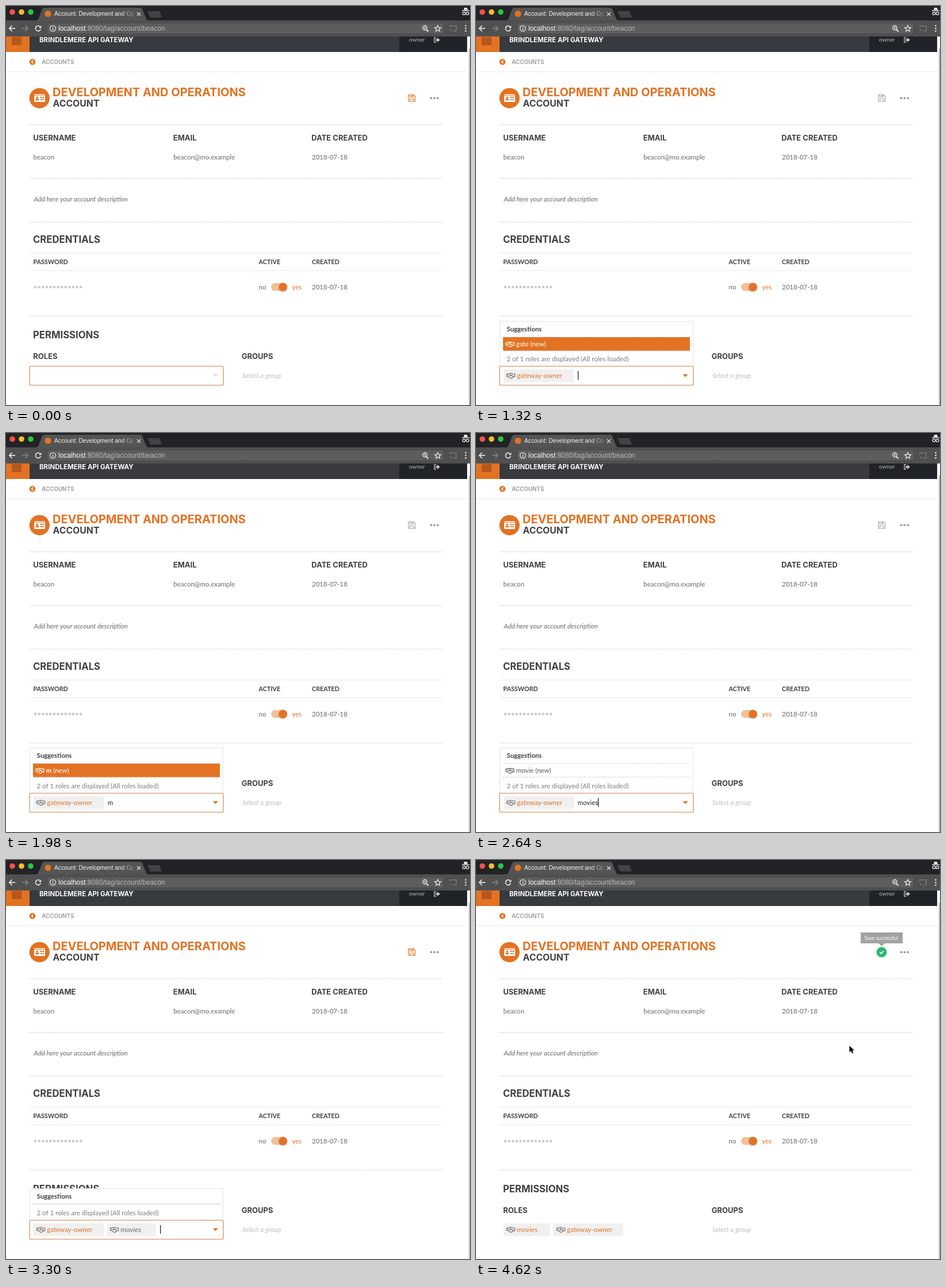
Write an HTML page with a canvas that moves like this. It is 807 px wide and 694 px high and loops after 4950 ms.

```html
<!DOCTYPE html>
<html lang="en">
<head>
<meta charset="utf-8">
<title>Account roles</title>
<style>
html, body { margin: 0; width: 100%; height: 100%; overflow: hidden; background: #fff; }
canvas { display: block; }
</style>
</head>
<body>
<canvas id="stage" width="807" height="694"></canvas>
<script>
const ctx = document.getElementById('stage').getContext('2d');
const ORANGE = '#e37222', DARK = '#3f4042', GREY = '#696969';
const STEP = 330;
const ROLE = 'gateway-owner';

const lato = (size, style = '') => `${style} ${size}px Lato, sans-serif`;
const head = size => `700 ${size}px Inter, sans-serif`;
const ui = size => `${size}px "Liberation Sans", Arial, sans-serif`;
const BODY = lato(11.5), BOLD = lato(11.4, '700'), ITALIC = lato(11.5, 'italic');

// Draws text and returns the x where it ends.
function text(str, x, y, font = BODY, color = GREY) {
  ctx.font = font;
  ctx.fillStyle = color;
  ctx.fillText(str, x, y);
  return x + ctx.measureText(str).width;
}

function rect(x, y, w, h, color) {
  ctx.fillStyle = color;
  ctx.fillRect(x, y, w, h);
}

function circle(x, y, r, color) {
  ctx.beginPath();
  ctx.arc(x, y, r, 0, Math.PI * 2);
  ctx.fillStyle = color;
  ctx.fill();
}

function trace(points, close) {
  ctx.beginPath();
  points.forEach(([x, y]) => ctx.lineTo(x, y));
  if (close) ctx.closePath();
}

function poly(points, color) {
  trace(points, true);
  ctx.fillStyle = color;
  ctx.fill();
}

function line(points, color, width = 1, close = false) {
  trace(points, close);
  ctx.strokeStyle = color;
  ctx.lineWidth = width;
  ctx.stroke();
}

function ring(x, y, r, color, width = 1, from = 0, to = Math.PI * 2) {
  ctx.beginPath();
  ctx.arc(x, y, r, from, to);
  ctx.strokeStyle = color;
  ctx.lineWidth = width;
  ctx.stroke();
}

function dotted(x1, x2, y, color = '#cfcfcf', width = 1.3) {
  ctx.setLineDash([1.6, 1.6]);
  line([[x1, y], [x2, y]], color, width);
  ctx.setLineDash([]);
}

function at(x, y, draw) {
  ctx.save();
  ctx.translate(x, y);
  draw();
  ctx.restore();
}

function handshake(x, y, color) {
  at(x, y, () => {
    line([[0, -3], [3, -3], [5, -4], [9, -4], [11, -3], [14, -3], [14, 2],
      [12, 2], [8, 4.5], [5.5, 4], [2.5, 1.5], [0, 1.5]], color, 1.2, true);
    line([[7.5, -3.5], [5, -0.5], [6.5, 0.7], [8.5, -1], [11.5, 2]], color, 1.1);
    line([[2.5, -3], [2.5, 1.5]], color, 0.8);
  });
}

function star(cx, cy, r) {
  const points = Array.from({ length: 10 }, (_, i) => {
    const a = i * Math.PI / 5 - Math.PI / 2, d = i % 2 ? r * 0.45 : r;
    return [cx + d * Math.cos(a), cy + d * Math.sin(a)];
  });
  line(points, '#f0f0f0', 1.2, true);
}

function drawBrowser() {
  rect(0, 0, 807, 25, '#212326');
  ['#fc5049', '#fdbb2d', '#2bc840'].forEach((c, i) => circle(11 + 16 * i, 10.5, 4.8, c));
  poly([[53, 25], [56, 23], [63, 5], [66, 3], [234, 3], [237, 5], [244, 23], [247, 25]], '#545454');
  poly([[246, 9], [267, 9], [271, 20], [251, 20]], '#424344');
  circle(73, 13.5, 5.5, ORANGE);
  const fade = ctx.createLinearGradient(200, 0, 224, 0);
  fade.addColorStop(0, '#f4f4f4');
  fade.addColorStop(1, '#666');
  text('Account: Development and Op', 84, 17, ui(10.2), fade);
  line([[228, 11], [234, 17]], '#ddd', 1.3);
  line([[234, 11], [228, 17]], '#ddd', 1.3);

  // private-window badge
  poly([[796, 7], [797, 3], [802, 3], [803, 7]], '#eee');
  rect(793, 7.5, 13, 1.4, '#eee');
  ring(796.5, 13, 2.4, '#eee', 1.3);
  ring(802.5, 13, 2.4, '#eee', 1.3);

  rect(0, 25, 807, 28, '#505050');
  ctx.beginPath();
  ctx.roundRect(71.5, 29.5, 690, 19, 2.5);
  ctx.fillStyle = '#5d5d5d';
  ctx.fill();
  ctx.strokeStyle = '#484848';
  ctx.lineWidth = 1;
  ctx.stroke();
  const arrow = (x, dir, color) => {
    line([[x - 5, 39], [x + 5, 39]], color, 1.6);
    line([[x + dir * 0.5, 34], [x + dir * 5.2, 39], [x + dir * 0.5, 44]], color, 1.6);
  };
  arrow(11, -1, '#f2f2f2');
  arrow(33, 1, '#858585');
  ring(56, 39, 4.5, '#f2f2f2', 1.6, 0.3, 5.4);
  poly([[57, 38.3], [61.3, 38.3], [61.3, 34]], '#f2f2f2');
  ring(81.5, 39, 5, '#eee', 1.2);
  rect(80.9, 38, 1.3, 4, '#eee');
  rect(80.9, 35.8, 1.3, 1.3, '#eee');
  const end = text('localhost', 91, 43, ui(12), '#fff');
  text(':8080/tag/account/beacon', end, 43, ui(12), '#b9b9b9');
  ring(728.5, 38, 3.7, '#f0f0f0', 1.4);
  line([[731, 41], [734.5, 44.5]], '#f0f0f0', 1.8);
  line([[726.7, 38], [730.3, 38]], '#f0f0f0', 1);
  line([[728.5, 36.2], [728.5, 39.8]], '#f0f0f0', 1);
  star(751, 39.5, 5.6);
  line([[772, 37], [772, 34.5], [783, 34.5], [783, 43.5], [778, 43.5]], '#858585', 1.2);
  ring(772, 44, 2.5, '#858585', 1.1, -Math.PI / 2, 0);
  [34.5, 39, 43.5].forEach(y => circle(799.5, y, 1.3, '#f0f0f0'));
}

function drawHeader() {
  rect(0, 53, 41, 27, ORANGE);
  rect(10, 54, 17, 14, '#b4581b');
  rect(41, 53, 643, 27, '#373a3f');
  rect(684, 53, 118, 27, '#202428');
  text('BRINDLEMERE API GATEWAY', 58, 63, head(11.5), '#fff');
  text('owner', 701, 62, lato(9.8), '#b5b7b9');
  line([[748, 55], [745, 55], [745, 63], [748, 63]], '#c4c6c8', 1.3);
  rect(747, 57.7, 4, 2.8, '#c4c6c8');
  poly([[750, 55], [755, 59], [750, 63]], '#c4c6c8');

  rect(802, 53, 5, 641, '#fafafa');
  rect(805, 74, 2, 620, '#bfbfbf');
  circle(46, 97.2, 5.3, ORANGE);
  line([[47.3, 94.6], [44.7, 97.2], [47.3, 99.8]], '#fff', 1.5);
  text('ACCOUNTS', 62, 101.3, head(9.8), '#a3a3a3');
  rect(0, 114, 802, 1, '#e8e8e8');
}

function drawAccount() {
  circle(58.3, 160.3, 17.6, ORANGE);
  ctx.beginPath();
  ctx.roundRect(49, 153.5, 19, 13.5, 1.5);
  ctx.fillStyle = '#fff';
  ctx.fill();
  rect(49, 155.2, 19, 0.9, ORANGE);
  circle(54.3, 159.3, 1.7, ORANGE);
  rect(51.5, 161.3, 5.6, 2.8, ORANGE);
  rect(59.3, 158, 3, 2, ORANGE);
  rect(63.3, 158, 2.7, 2, ORANGE);
  rect(59.3, 162, 6.7, 1.6, ORANGE);
  text('DEVELOPMENT AND OPERATIONS', 81, 157, head(20), ORANGE);
  text('ACCOUNT', 81.6, 175, head(15.8), DARK);
  [739.5, 745.2, 751].forEach(x => circle(x, 160.3, 1.8, '#8d8d8d'));

  [206.7, 300, 375.8, 539.2].forEach(y => dotted(41, 759, y));
  [['USERNAME', 47.3], ['EMAIL', 290.8], ['DATE CREATED', 531.3]]
    .forEach(([label, x]) => text(label, x, 234, head(13), DARK));
  text('beacon', 47.5, 266.5);
  text('beacon@mo.example', 291.3, 266.5);
  text('2018-07-18', 532, 267.3);
  text('Add here your account description', 48.5, 340, ITALIC);

  text('CREDENTIALS', 47, 412, head(16.7), DARK);
  rect(41, 429, 717, 1, '#e9e9e9');
  rect(41, 460, 717, 1, '#e9e9e9');
  [['PASSWORD', 47.3], ['ACTIVE', 439.5], ['CREATED', 532]]
    .forEach(([label, x]) => text(label, x, 449.2, lato(10.8, '700'), DARK));
  for (let i = 0; i < 13; i++) circle(51 + 6.6 * i, 488.9, 2.3, '#cbcbcb');
  text('no', 439.5, 492.5);
  ctx.beginPath();
  ctx.roundRect(461, 482, 28, 13.5, 6.75);
  ctx.fillStyle = '#f5bf98';
  ctx.fill();
  ctx.save();
  ctx.shadowColor = 'rgba(0,0,0,.3)';
  ctx.shadowBlur = 3;
  ctx.shadowOffsetY = 1;
  circle(481.8, 488.8, 7.2, ORANGE);
  ctx.restore();
  text('yes', 497.5, 492.5, BODY, ORANGE);
  text('2018-07-18', 532, 492.5);

  text('PERMISSIONS', 47, 578, head(16.7), DARK);
  text('ROLES', 47.3, 613.6, head(13), DARK);
  text('GROUPS', 409.7, 613.6, head(13), DARK);
  text('Select a group', 411, 647, ITALIC, '#bdbdbd');
}

function drawMenu({ rows, active = -1, lift = 0 }) {
  const rowsTop = 600 - 24 * rows.length - lift;
  const top = rowsTop - (rows.length ? 28 : 29);
  rect(41, top, 337, 627 - top, '#fff');
  ctx.strokeStyle = '#e4e4e4';
  ctx.lineWidth = 1;
  ctx.strokeRect(41.5, top + 0.5, 336, 627 - top);
  text('Suggestions', 53.5, rowsTop - (rows.length ? 10 : 11), BOLD, DARK);
  if (!rows.length) dotted(47, 372, 598.5, '#d8d8d8', 3);
  rows.forEach(([bold, rest], i) => {
    const y = rowsTop + 24 * i, on = i === active;
    const color = on ? '#fff' : '#555';
    if (on) rect(47, y, 325, 24, ORANGE);
    dotted(47, 372, y - 0.3);
    handshake(52, y + 12.3, color);
    const x = text(bold, 69.7, y + 16, BOLD, on ? '#fff' : DARK);
    text(rest, x, y + 16, BODY, color);
  });
  if (rows.length) dotted(47, 372, 599.5 - lift);
  text('2 of 1 roles are displayed (All roles loaded)', 53.5, 618, BODY, '#7c7c7c');
}

function drawTag([label, x, width, color]) {
  rect(x, 632, width, 22, '#f0f0f0');
  handshake(x + 5.5, 643, '#6a6a6a');
  text(label, x + 23.3, 647, BODY, color);
}

function drawField({ tags = [], typed = '', typedX = 48.7, caret, idle }) {
  ctx.beginPath();
  ctx.roundRect(41, 626.5, 337, 33, 2);
  ctx.fillStyle = '#fff';
  ctx.fill();
  ctx.strokeStyle = '#d3874f';
  ctx.lineWidth = 1.2;
  ctx.stroke();
  poly([[359.5, 640.5], [369, 640.5], [364.2, 645.2]], idle ? '#dcdcdc' : ORANGE);
  tags.forEach(drawTag);
  const end = text(typed, typedX, 647, BODY, '#222');
  if (caret) rect(Math.round(end), 635, 1.2, 15, '#111');
}

function drawSave(color) {
  line([[700, 154.5], [709, 154.5], [711.5, 157], [711.5, 166], [700, 166]], color, 1.2, true);
  line([[702.5, 154.5], [702.5, 158.5], [708, 158.5], [708, 154.5]], color, 1.1);
  line([[702.5, 166], [702.5, 161.8], [709, 161.8], [709, 166]], color, 1.1);
  rect(705.6, 155, 1.4, 2.5, color);
}

function drawSaved() {
  rect(669, 126, 73, 19, '#a2a2a2');
  poly([[700.5, 145], [710.5, 145], [705.5, 150]], '#a2a2a2');
  text('Save successful', 675.7, 138.6, lato(8.65), '#fff');
  circle(705.5, 160.3, 9, '#2eb872');
  line([[702.3, 160.3], [704.7, 162.6], [708.9, 158.2]], '#fff', 1.7);
}

function drawPointer([x, y]) {
  at(x, y, () => {
    const shape = [[0, 0], [0, 11.5], [2.7, 9], [4.6, 13.3], [6.7, 12.4], [4.8, 8.2], [8.3, 8.2]];
    line(shape, '#fff', 1.8, true);
    poly(shape, '#000');
  });
}

const fresh = name => ['', `${name} (new)`];
const matched = (key, rest) => [key, rest];
const gateTag = [ROLE, 48, 122, ORANGE];
const moviesTag = ['movies', 176, 85, GREY];
const first = { tags: [gateTag], typedX: 176.7 };
const both = { tags: [gateTag, moviesTag], typedX: 268 };
const empty = { rows: [] };

// One scene per step of the loop.
const scenes = [
  { field: { idle: true } },
  { field: { typed: 'ga', caret: true }, menu: { rows: [matched('ga', ' (new)'), matched('ga', ROLE.slice(2))], active: 0 } },
  { field: { typed: 'gate', caret: true }, menu: { rows: [matched('gate', ' (new)'), matched('gate', ROLE.slice(4))], active: 0 } },
  { field: { typed: 'gate', caret: true }, menu: { rows: [matched('gate', ' (new)'), matched('gate', ROLE.slice(4))], active: 1 } },
  { field: { ...first, caret: true }, menu: { rows: [fresh('gate')], active: 0 }, clean: true },
  { field: { ...first, caret: true }, menu: empty, clean: true },
  { field: { ...first, typed: 'm' }, menu: { rows: [matched('m', ' (new)')], active: 0, lift: 1 }, clean: true },
  { field: { ...first, typed: 'mov', caret: true }, menu: { rows: [fresh('mo')], lift: 1 }, clean: true },
  { field: { ...first, typed: 'movies', caret: true }, menu: { rows: [fresh('movie')], lift: 1 }, clean: true },
  { field: { ...both, caret: true }, menu: { rows: [fresh('movies')], active: 0 } },
  { field: { ...both, caret: true }, menu: empty },
  { field: both, menu: empty, pointer: [732, 222] },
  { field: { ...both, caret: true }, menu: empty, pointer: [708, 162] },
  { tags: [gateTag, ['movies', 176, 80, ORANGE]], pointer: [712, 163] },
  { tags: [['movies', 48, 80.5, ORANGE], [ROLE, 135, 121, ORANGE]], saved: true, pointer: [649.5, 323] }
];

function render(time) {
  const scene = scenes[Math.floor(time / STEP) % scenes.length];
  rect(0, 0, 807, 694, '#fff');
  drawBrowser();
  drawHeader();
  drawAccount();
  if (scene.saved) drawSaved();
  else drawSave(scene.clean ? '#a5a5a5' : ORANGE);
  if (scene.menu) drawMenu(scene.menu);
  if (scene.field) drawField(scene.field);
  if (scene.tags) scene.tags.forEach(drawTag);
  if (scene.pointer) drawPointer(scene.pointer);
}

const start = performance.now();
function tick() {
  render(performance.now() - start);
  requestAnimationFrame(tick);
}
tick();
</script>
</body>
</html>
```
